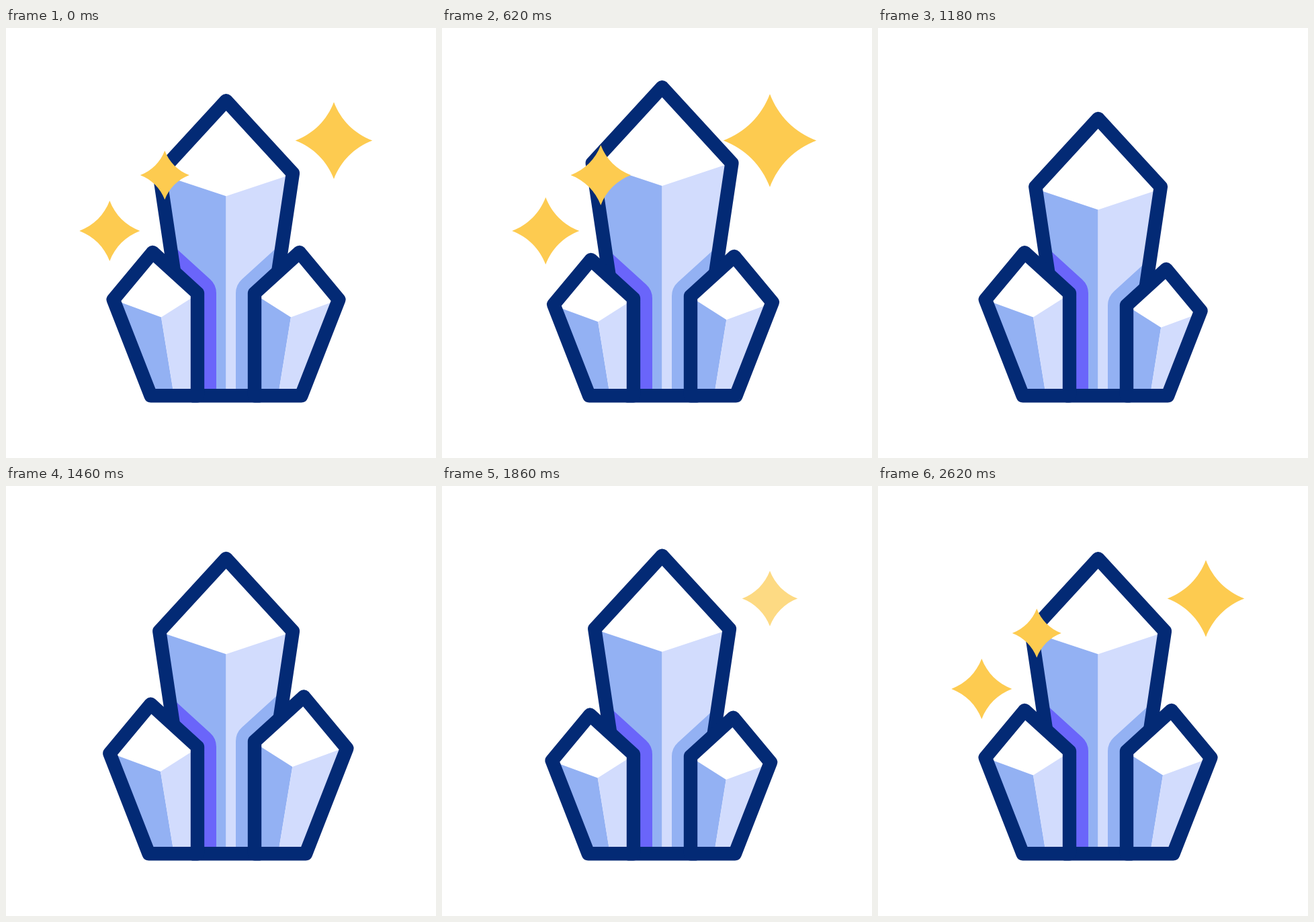
An HTML page with a canvas for the animation above (2.8 s loop, 640 px wide and 640 px high).

```html
<!DOCTYPE html>
<html lang="en">
<head>
<meta charset="utf-8">
<title>Crystals</title>
<style>
  html, body { margin: 0; width: 100%; height: 100%; overflow: hidden; background: #fff; }
  canvas { display: block; width: 640px; height: 640px; }
</style>
</head>
<body>
<canvas id="stage" width="640" height="640"></canvas>
<script>
const ctx = document.getElementById('stage').getContext('2d');
const LOOP = 2800, BASE = 547.2, LINE = 20.4;
const NAVY = '#032a75', BLUE = '#93b1f3', PALE = '#d2dcfd', PURPLE = '#6a65fa', GOLD = '#fdcb50';

// out: when a star starts to vanish; back: when it is fully grown again.
const stars = [
  { x: 488, y: 167.5, rest: 57.3, peak: 70, out: 700, back: 1960 },
  { x: 154.3, y: 302, rest: 45, peak: 51, out: 755, back: 2185 },
  { x: 236.3, y: 219, rest: 36.5, peak: 48.5, out: 830, back: 2280 }
];

// Eased progress from 0 to 1; a power above 1 makes the start slower.
function ease(t, from, span, power = 1) {
  const u = Math.max(0, Math.min(1, (t - from) / span)) ** power;
  return u * u * (3 - 2 * u);
}

// Slow wind-up, quick release, then a damped swing back to 1.
function swing(t, delay, amp) {
  const s = t - delay;
  return 1 + amp * (ease(s, 0, 1000, 1.35) - 1.84 * ease(s, 1000, 230)
    + 1.27 * ease(s, 1230, 410) - 0.43 * ease(s, 1640, 380));
}

function polygon(points) {
  const path = new Path2D();
  points.forEach(([x, y]) => path.lineTo(x, y));
  path.closePath();
  return path;
}

function fill(path, color) {
  ctx.fillStyle = color;
  ctx.fill(path);
}

function stroke(path, color, width) {
  ctx.strokeStyle = color;
  ctx.lineWidth = width;
  ctx.stroke(path);
}

function clipped(path, draw) {
  ctx.save();
  ctx.clip(path);
  draw();
  ctx.restore();
}

// Two shaded faces meeting at (x, y), with the dividing edge ending at footX.
function facets(x, y, footX, leftSlope, rightSlope) {
  const side = (d, slope) => polygon([[x + d * 200, y - 200 * slope], [x, y], [footX, BASE], [x + d * 200, BASE]]);
  fill(side(-1, leftSlope), BLUE);
  fill(side(1, rightSlope), PALE);
}

// Points are given from a foot point, with y upwards.
function shapeAt(x, d, s, points) {
  return polygon(points.map(([px, py]) => [x + d * px * s, BASE - py * s]));
}

function sideCrystal(x, d, s) {
  const shape = shapeAt(x, d, s, [[0, 0], [0, 152.5], [66.8, 213.3], [125.3, 143], [69.5, 0]]);
  const draw = () => {
    const slopes = [0.635, 0.367];
    if (d < 0) slopes.reverse();
    fill(shape, '#fff');
    clipped(shape, () => facets(x + d * (30 + 24 * s), 560.5 - 130 * s, x + d * 35, ...slopes));
    stroke(shape, NAVY, LINE);
  };
  return { shape, draw };
}

function drawBody(s, left, right) {
  const cx = 327.6;
  const shape = shapeAt(cx, 1, s, [[-50, 0], [-99.3, 331], [0, 439], [99.3, 331], [50, 0]]);
  fill(shape, '#fff');
  clipped(shape, () => {
    facets(cx, 582.8 - 332.5 * s, cx, 0.333, 0.333);
    stroke(left, PURPLE, 56);
    stroke(right, BLUE, 56);
  });
  stroke(shape, NAVY, LINE);
}

function drawStar({ x, y, rest, peak, out, back }, t) {
  const shrink = ease(t, out, 200), regrow = ease(t, back - 225, 225);
  const swell = ease(t, out - 715, 715, 1.35) - ease(t, back, 340);
  const r = rest + (peak - rest) * swell + peak * (regrow - shrink);
  if (r < 0.1) return;
  ctx.save();
  ctx.globalAlpha = Math.min(1, (1 - shrink) ** 1.2 + 1.2 * regrow);
  ctx.translate(x, y);
  ctx.scale(r, r);
  ctx.beginPath();
  ctx.moveTo(0, -1);
  for (let i = 0; i < 4; i++) {
    ctx.bezierCurveTo(0.18, -0.53, 0.53, -0.18, 1, 0);
    ctx.rotate(Math.PI / 2);
  }
  ctx.fillStyle = GOLD;
  ctx.fill();
  ctx.restore();
}

function render(t) {
  ctx.fillStyle = '#fff';
  ctx.fillRect(0, 0, 640, 640);
  ctx.lineJoin = 'round';
  const left = sideCrystal(285, -1, swing(t, 60, -0.118));
  const right = sideCrystal(370, 1, swing(t, 195, -0.118));
  drawBody(swing(t, -20, 0.08), left.shape, right.shape);
  left.draw();
  right.draw();
  stars.forEach(star => drawStar(star, t));
}

const start = performance.now();
function tick() {
  render((performance.now() - start) % LOOP);
  requestAnimationFrame(tick);
}
tick();
</script>
</body>
</html>
```
